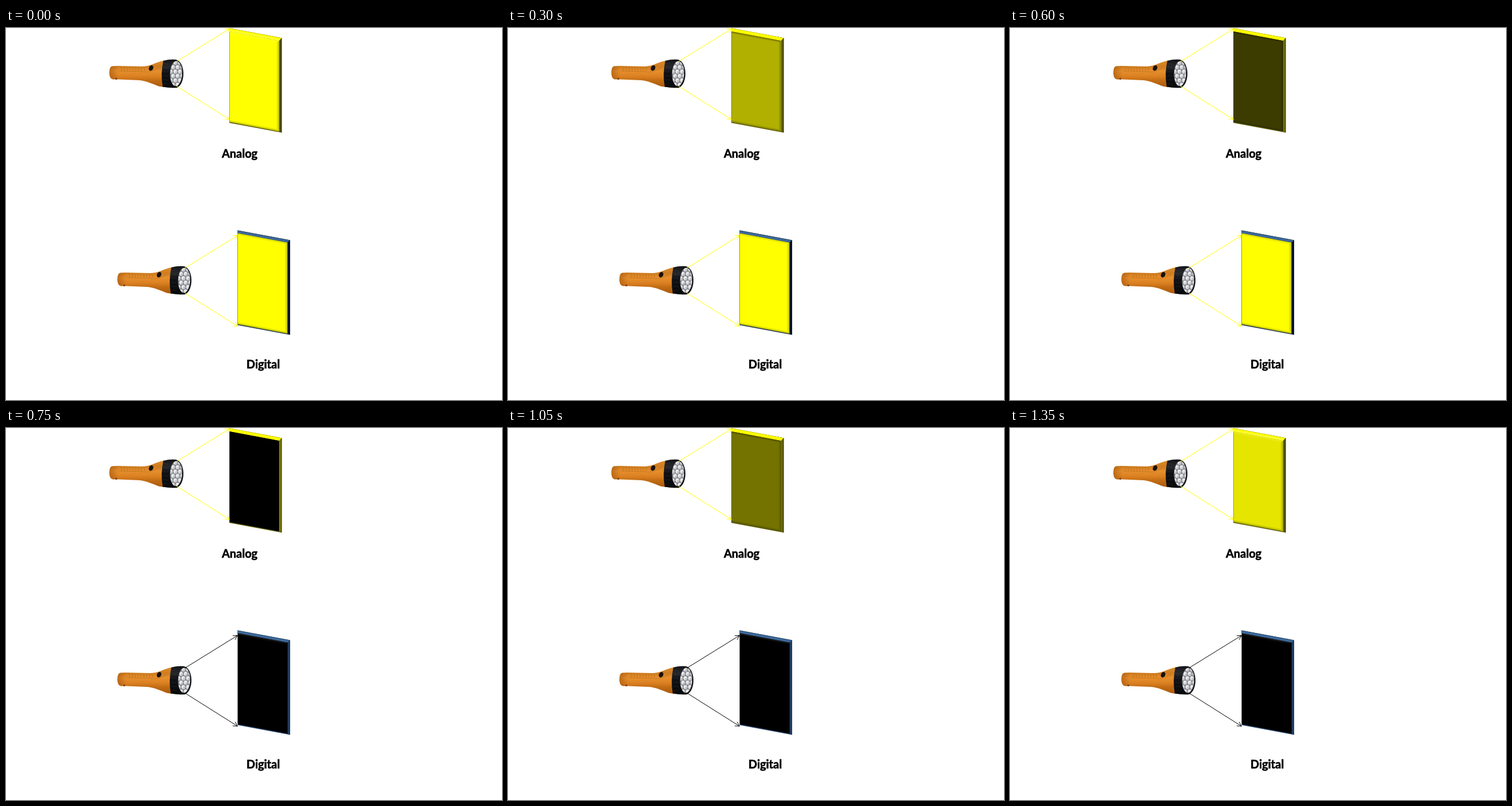
An HTML page with a canvas that plays this animation: 864x648 px, repeating every 1500 ms.

```html
<!DOCTYPE html>
<html lang="en">
<head>
<meta charset="utf-8">
<title>Analog and digital light</title>
<style>
html, body { margin: 0; width: 100%; height: 100%; overflow: hidden; background: #fff; }
canvas { display: block; }
</style>
</head>
<body>
<canvas id="stage" width="864" height="648"></canvas>
<script>
const ctx = document.getElementById('stage').getContext('2d');
const STEP = 150, STEPS = 10;
const LEVELS = [255, 229, 177, 116, 61, 0];
const SLOPE = 17 / 91;
const yellow = v => `rgb(${v},${Math.round(v * 0.98 + v * v / 255 * 0.02)},0)`;

function gradient(x0, y0, x1, y1, stops) {
  const g = ctx.createLinearGradient(x0, y0, x1, y1);
  stops.forEach(([p, c]) => g.addColorStop(p, c));
  return g;
}

function poly(points, fill) {
  ctx.beginPath();
  points.forEach(([x, y]) => ctx.lineTo(x, y));
  ctx.closePath();
  ctx.fillStyle = fill;
  ctx.fill();
}

function oval(x, y, rx, ry, angle, fill) {
  ctx.beginPath();
  ctx.ellipse(x, y, rx, ry, angle, 0, Math.PI * 2);
  ctx.fillStyle = fill;
  ctx.fill();
}

function torchBody() {
  ctx.beginPath();
  ctx.moveTo(180, 78);
  ctx.quadraticCurveTo(180, 67.5, 185, 66.5);
  ctx.lineTo(194, 66);
  ctx.lineTo(238, 67);
  ctx.bezierCurveTo(252, 66.5, 260, 60, 274, 57);
  ctx.lineTo(275, 103);
  ctx.lineTo(266, 101.5);
  ctx.bezierCurveTo(254, 97, 244, 92, 232, 91);
  ctx.lineTo(196, 89.5);
  ctx.lineTo(186, 89.5);
  ctx.quadraticCurveTo(180, 88, 180, 78);
  ctx.fillStyle = gradient(0, 58, 0, 103, [
    [0, '#d98a2c'], [0.2, '#cf7c1f'], [0.38, '#e58f2e'],
    [0.58, '#dc8122'], [0.74, '#c26c14'], [1, '#a9590f']]);
  ctx.fill();
  ctx.save();
  ctx.clip();
  ctx.fillStyle = gradient(180, 0, 196, 0, [
    [0, 'rgba(130,60,0,.4)'], [1, 'rgba(130,60,0,0)']]);
  ctx.fillRect(180, 64, 16, 27);
  ctx.strokeStyle = 'rgba(150,75,5,.35)';
  ctx.lineWidth = 1;
  for (let x = 199; x < 240; x += 5) {
    ctx.beginPath();
    ctx.moveTo(x, 67);
    ctx.quadraticCurveTo(x + 4, 70, x + 2, 75);
    ctx.stroke();
  }
  ctx.beginPath();
  ctx.moveTo(196, 75);
  ctx.lineTo(238, 76);
  ctx.quadraticCurveTo(252, 79, 266, 69);
  ctx.stroke();
  ctx.restore();
  oval(192, 88.5, 1.5, 1.2, 0, '#5a2c08');
  oval(252.7, 69.8, 3.7, 5, 0.45, '#17110d');
}

function torchHead() {
  ctx.beginPath();
  ctx.moveTo(274, 57);
  ctx.quadraticCurveTo(285, 54, 296, 55);
  ctx.bezierCurveTo(313, 59, 313, 97, 298, 104);
  ctx.quadraticCurveTo(285, 105, 273, 102.5);
  ctx.quadraticCurveTo(269, 80, 274, 57);
  ctx.fillStyle = gradient(0, 55, 0, 104, [
    [0, '#141518'], [0.25, '#26282c'], [0.45, '#101114'], [1, '#08090b']]);
  ctx.fill();
  ctx.strokeStyle = 'rgba(85,90,98,.3)';
  ctx.lineWidth = 0.8;
  for (let y = 62; y < 103; y += 7) {
    ctx.beginPath();
    ctx.moveTo(274, y);
    ctx.lineTo(283, y + 0.5);
    ctx.stroke();
  }
  oval(296.3, 79.5, 10.7, 22, 0.03, '#77797d');
  ctx.save();
  ctx.beginPath();
  ctx.ellipse(296.3, 79.5, 10.1, 21.4, 0.03, 0, Math.PI * 2);
  ctx.clip();
  for (let row = 0; row < 6; row++) {
    for (let col = 0; col < 3; col++) {
      const x = 287 + col * 8 + (row % 2) * 4, y = 60.5 + row * 7.7;
      oval(x, y, 3.6, 4, 0, '#c2c3c7');
      oval(x - 0.4, y - 0.5, 2.4, 2.8, 0, '#ececee');
      oval(x + 0.7, y + 0.8, 0.9, 1, 0, '#a2a3a8');
    }
  }
  ctx.restore();
}

function torch(dx, dy) {
  ctx.save();
  ctx.translate(dx, dy);
  torchBody();
  torchHead();
  ctx.restore();
}

function arrow(x0, y0, x1, y1, color) {
  const a = Math.atan2(y1 - y0, x1 - x0);
  const wing = s => [x1 - 8.5 * Math.cos(a + s), y1 - 8.5 * Math.sin(a + s)];
  ctx.strokeStyle = color;
  ctx.lineWidth = 1;
  ctx.beginPath();
  ctx.moveTo(x0, y0);
  ctx.lineTo(x1, y1);
  ctx.moveTo(...wing(0.5));
  ctx.lineTo(x1, y1);
  ctx.lineTo(...wing(-0.5));
  ctx.stroke();
}

function beams(dx, dy, color) {
  arrow(297 + dx, 58 + dy, 389 + dx, 1 + dy, color);
  arrow(297 + dx, 101 + dy, 389 + dx, 159 + dy, color);
}

// A sheared slab: top edge, right edge, then the face with a soft bevel.
function board(x, y, level, look) {
  const W = 91.3, H = 165, lit = level / 255;
  const right = W - 4.5, top = look.depth, bottom = H - 1.5;
  ctx.save();
  ctx.transform(1, SLOPE, 0, 1, x, y);
  poly([[0, 0], [W, 0], [W, H], [0, H]], look.edge);
  poly([[0, 0], [W, 0], [right, top], [0, top]], gradient(0, 0, 0, top, look.top));
  poly([[W, 0], [W, H], [right, bottom], [right, top]], gradient(right, 0, W, 0, look.side));
  poly([[0.5, top], [right, top], [right, bottom], [0.5, bottom]], yellow(level));
  poly([[0.5, top], [right, top], [right - 4, top + 4], [0.5, top + 4]],
    gradient(0, top, 0, top + 4, [
      [0, `rgba(${look.bevel},${0.3 + 0.1 * lit})`], [1, `rgba(${look.bevel},0)`]]));
  poly([[right, top], [right, bottom], [right - 5, bottom - 4], [right - 5, top + 4]],
    gradient(right - 5, 0, right, 0, [[0, 'rgba(0,0,0,0)'], [1, 'rgba(0,0,0,.25)']]));
  poly([[0.5, bottom - 4], [right - 5, bottom - 4], [right, bottom], [0.5, bottom]],
    gradient(0, bottom - 4, 0, bottom, [[0, 'rgba(0,0,0,0)'], [1, 'rgba(0,0,0,.25)']]));
  ctx.restore();
}

function analogLook(level) {
  const lit = level / 255;
  const shade = Math.round(150 - 55 * lit);
  return {
    depth: 5.8,
    edge: '#5c5b00',
    top: [[0, '#d8d500'], [0.2, '#ffff00'], [1, lit > 0.8 ? '#ffff40' : '#ffff00']],
    side: [[0, yellow(shade)], [0.5, yellow(Math.round(shade * 0.8))], [1, '#343300']],
    bevel: lit > 0.8 ? '255,255,90' : '0,0,0'
  };
}

function digitalLook(on) {
  return {
    depth: 5,
    edge: on ? '#1c3049' : '#25426a',
    top: [[0, '#23415f'], [0.4, '#4472a8'], [1, '#315985']],
    side: on ? [[0, '#15263a'], [0.5, '#07101b'], [1, '#03070d']]
             : [[0, '#0f1f33'], [0.5, '#25456d'], [1, '#132943']],
    bevel: on ? '150,150,0' : '85,85,85'
  };
}

function label(text, x, y) {
  ctx.font = '700 20px Lato, Carlito, sans-serif';
  ctx.textAlign = 'center';
  ctx.fillStyle = ctx.strokeStyle = '#000';
  ctx.lineWidth = 0.6;
  ctx.fillText(text, x, y);
  ctx.strokeText(text, x, y);
}

function draw(now) {
  const step = Math.floor(now / STEP) % STEPS;
  const level = LEVELS[Math.min(step, STEPS - step)];
  const on = step < STEPS / 2;
  ctx.fillStyle = '#fff';
  ctx.fillRect(0, 0, 864, 648);
  torch(0, 0);
  torch(14, 360);
  board(389, 0.2, level, analogLook(level));
  board(403.4, 352.5, on ? 255 : 0, digitalLook(on));
  beams(0.3, 0.4, '#ffff00');
  beams(14.3, 360.4, on ? '#ffff00' : '#000');
  label('Analog', 407, 226);
  label('Digital', 448, 593);
  requestAnimationFrame(draw);
}
requestAnimationFrame(draw);
</script>
</body>
</html>
```
